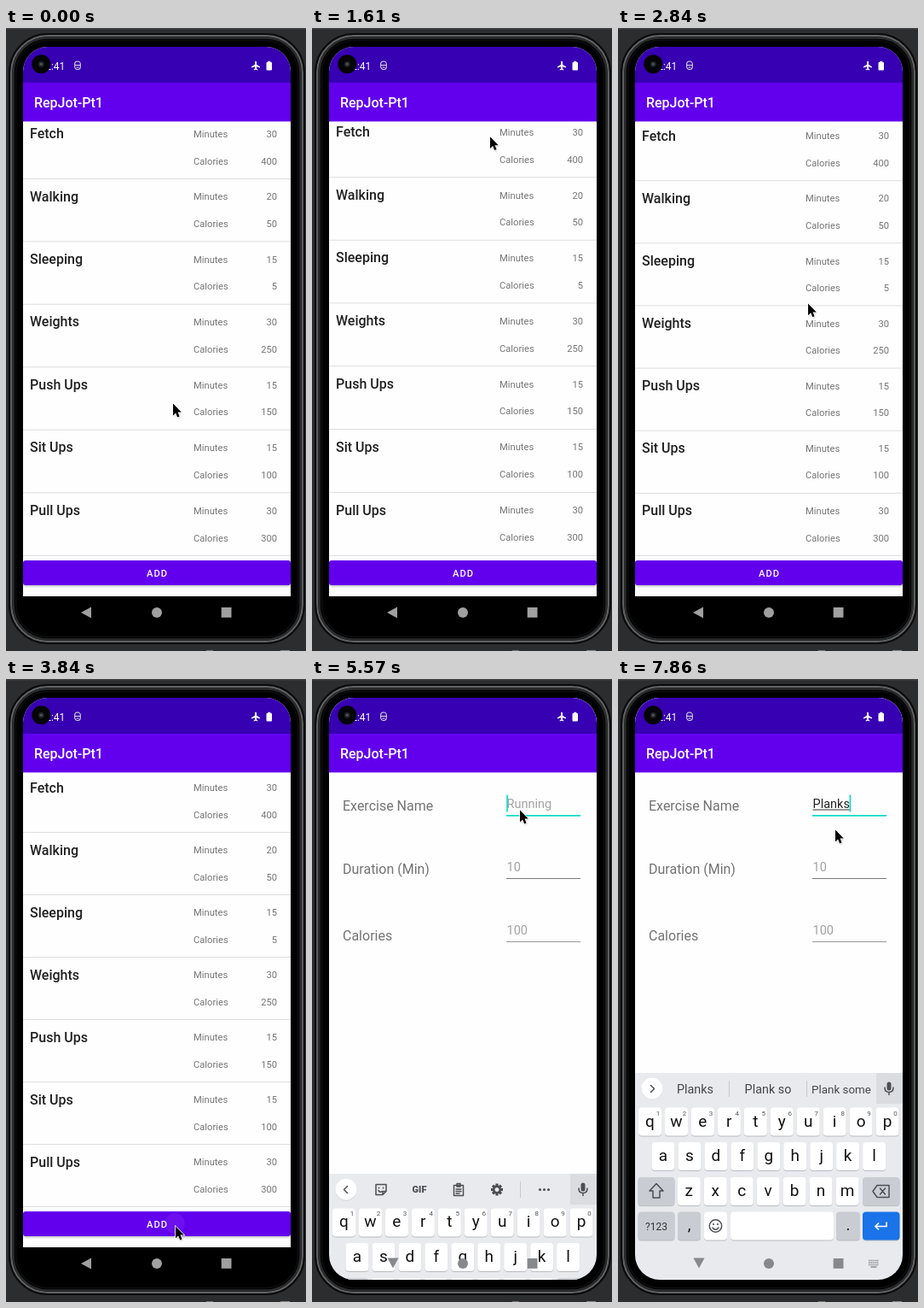
Animation, 352 px wide and 729 px high, one loop 8 s. Source, as an HTML page:

```html
<!DOCTYPE html>
<html lang="en">
<head>
<meta charset="utf-8">
<title>Exercise log</title>
<style>
html, body { margin: 0; width: 100%; height: 100%; overflow: hidden; background: #2c2d2f; }
svg { display: block; width: 352px; height: 729px; font-family: Roboto, sans-serif; }
.title { font-size: 16px; font-weight: 500; fill: #fff; }
.name { font-size: 16px; font-weight: 500; fill: #202020; }
.cell { font-size: 11.2px; fill: #757575; }
.end { text-anchor: end; }
.mid { text-anchor: middle; }
.btn { font-size: 11.2px; font-weight: 500; fill: #fff; letter-spacing: 1px; text-anchor: middle; }
.label { font-size: 16px; fill: #737373; }
.field { font-size: 14.5px; }
.key { font-size: 19px; fill: #111; text-anchor: middle; }
.digit { font-size: 8px; fill: #555; text-anchor: middle; }
.word { font-size: 14.4px; fill: #44474b; text-anchor: middle; }
.line { fill: none; stroke: #4b4e52; stroke-width: 1.5; stroke-linejoin: round; stroke-linecap: round; }
</style>
</head>
<body>
<svg id="stage" viewBox="0 0 352 729"></svg>
<script>
const LOOP = 8000;
const ROWS = [
  ['Fetch', 30, 400], ['Walking', 20, 50], ['Sleeping', 15, 5], ['Weights', 30, 250],
  ['Push Ups', 15, 150], ['Sit Ups', 15, 100], ['Pull Ups', 30, 300]
];
const PITCH = 73, LIST_END = 617.5;

// [time, x, y] of the pointer tip
const POINTER = [
  [0, 195, 438], [60, 195, 438], [840, 206, 122], [900, 206, 122], [1240, 202, 452],
  [1610, 208, 126], [1700, 210, 98], [1730, 210, 98], [2070, 222, 440], [2340, 231, 206],
  [2490, 235, 150], [2550, 235, 150], [3280, 198, 638], [3480, 198, 638], [3570, 198, 639],
  [4200, 198, 639], [4630, 232, 659], [4690, 238, 667], [4960, 266, 196], [5250, 245, 149],
  [5420, 243, 152], [7650, 243, 152], [7860, 254, 175]
];
// [time, upward shift of the top divider]
const STRETCH = [
  [0, 3], [60, 3], [840, 9], [900, 9], [1180, 1], [1610, 4.8], [1700, 6], [1730, 6],
  [2010, .6], [2340, 10], [2490, 11.5], [2550, 11.5], [2720, 3], [2950, 0]
];
const TYPED = [[0, ''], [6490, 'P'], [6640, 'Pl'], [6970, 'Pla'], [7120, 'Plan'], [7380, 'Plank'], [7410, 'Planks']];
const WORDS = [
  [0, null], [6520, ['P', 'Push', 'Pull']], [6760, ['Pl', 'Plus', 'Please']],
  [6970, ['Pla', 'Play', 'Playing']], [7140, ['Plan', 'Plans', 'Planning']],
  [7410, ['Plank', 'Planks', 'Planking']], [7650, ['Planks', 'Plank so', 'Plank some']]
];
const CAPS = [6400, 6560];
const PRESS = 3820, OPEN = 4020, FOCUS = 5300, KEYBOARD = 5510;

const text = (x, y, value, cls, extra = '') => `<text x="${x}" y="${y}" class="${cls}" ${extra}>${value}</text>`;
const rect = (x, y, w, h, fill, r = 0, extra = '') =>
  `<rect x="${x}" y="${y}" width="${w}" height="${h}" rx="${r}" fill="${fill}" ${extra}/>`;
const path = (d, extra = 'class="line"') => `<path d="${d}" ${extra}/>`;
const circle = (x, y, r, extra) => `<circle cx="${x}" cy="${y}" r="${r}" ${extra}/>`;
const at = (x, y, body) => `<g transform="translate(${x} ${y})">${body}</g>`;
const button = (x, y, w, label, extra = '') =>
  rect(x, y + 1.5, w, 29, '#000', 3, 'opacity=".25" filter="url(#soft)"') +
  rect(x, y, w, 29, '#6200ee', 3) + extra + text(x + w / 2 + .5, y + 18.5, label, 'btn');

const windowBase = () =>
  rect(20, 22, 314, 643, '#fefefe') + rect(20, 22, 314, 42, '#3700b3') +
  rect(20, 64, 314, 45.4, '#6200ee') + text(33, 93, 'RepJot-Pt1', 'title');

function listScreen() {
  const rows = ROWS.map(([name, minutes, calories], i) => `
    <g id="row${i}">${text(28, 0, name, 'name')}</g>
    <g id="minutes${i}">${text(220, 0, 'Minutes', 'cell')}${text(318, 0, minutes, 'cell end')}</g>
    <g id="calories${i}">${text(220, 0, 'Calories', 'cell')}${text(318, 0, calories, 'cell end')}</g>
    <rect id="rule${i}" x="20" y="-.5" width="314" height="1" fill="#dedede"/>`).join('');
  const ripple = `<g clip-path="url(#addClip)"><circle id="ripple" cx="198" cy="637" fill="#fff"/></g>`;
  return windowBase() + `<g clip-path="url(#listClip)">${rows}</g>` + button(20, 623, 314, 'ADD', ripple);
}

function formScreen() {
  const rows = [['Exercise Name', 154, 151], ['Duration (Min)', 228, 225], ['Calories', 305.5, 299]];
  const hints = ['Running', 10, 100], tones = ['#b0b0b0', '#777', '#999'];
  return windowBase() + rows.map(([label, y, base], i) =>
    text(36, y, label, 'label') +
    text(228.5, base, hints[i], 'field', `id="hint${i}" fill="#a2a2a2"`) +
    rect(228, base + 8, 87, 1, tones[i], 0, `id="under${i}"`)).join('') +
    text(228.5, 151, '', 'field', 'id="typed" fill="#222"') +
    rect(228.5, 152.5, 0, 1, '#333', 0, 'id="compose"') +
    rect(228, 135.5, 1.6, 20, '#03dac5', 0, 'id="caret"') +
    button(140, 599, 74, 'SUBMIT');
}

function key(x, y, w, label, fill = '#fff') {
  return rect(x, y + 1, w, 33, '#b9bcc1', 4) + rect(x, y, w, 33, fill, 4) + label;
}
function letters(chars, x0, y, digits) {
  return [...chars].map((c, i) => {
    const x = x0 + i * 30.95;
    return key(x - 13.5, y, 27, text(x, y + 22, c, 'key letter') +
      (digits ? text(x + 9.5, y + 9, (i + 1) % 10, 'digit') : ''));
  }).join('');
}
function toolbar() {
  const teeth = [...Array(8)].map((_, i) =>
    `<rect x="-1.6" y="-7" width="3.2" height="4" fill="#4b4e52" transform="rotate(${i * 45})"/>`).join('');
  return at(81, 479.5,
      path('M-6 -6H6V2L2 6H-6ZM2 6V2H6M-3 1Q-1 4 1 2') + circle(-2.5, -2, .9, 'fill="#4b4e52"') + circle(2.5, -2, .9, 'fill="#4b4e52"')) +
    text(126, 483.3, 'GIF', 'mid', 'font-size="11" font-weight="900" fill="#4b4e52"') +
    at(172, 480, path('M-5.5 -5.5H5.5V6.5H-5.5ZM-2 -7.5H2V-4H-2ZM-3 -1H3M-3 1.5H3M-3 4H1')) +
    at(217, 479.5, teeth + circle(0, 0, 3.8, 'fill="none" stroke="#4b4e52" stroke-width="2.6"')) +
    rect(244, 470, 1, 19, '#c6c9cd') +
    [267.5, 272.5, 277.5].map(x => circle(x, 479.5, 1.5, 'fill="#4b4e52"')).join('');
}
function keyboard() {
  const grey = '#c9cdd3';
  return rect(20, 461, 314, 243, '#e8eaed') + rect(303, 461, 31, 36, '#dadce0') +
    circle(40, 480, 12.5, 'fill="#c9ccd0"') + circle(40, 479.3, 12.5, 'fill="#fff"') +
    path('', 'id="chevron" class="line"') +
    `<g id="tools">${toolbar()}</g>
    <g id="words">${[90.5, 176, 262].map((x, i) => text(x, 485, '', 'word', `id="word${i}"`)).join('')}
      ${rect(130, 470, 1, 19, '#c6c9cd')}${rect(221, 470, 1, 19, '#c6c9cd')}</g>` +
    at(318, 479, rect(-2.5, -7.5, 5, 10, '#4b4e52', 2.5) + path('M-5 -1Q-5 4.5 0 4.5T5 -1M0 4.5V7.5')) +
    letters('qwertyuiop', 37.5, 501.5, true) + letters('asdfghjkl', 53, 542, false) +
    key(23.5, 583, 43, path('M45 590.5L53 599H49V607H41V599H37Z', 'id="shift" class="line"'), grey) +
    letters('zxcvbnm', 83.3, 583, false) +
    key(287, 583, 43.5, path('M304 592.5H318V606.5H304L299 599.5ZM307.5 596L313.5 603M313.5 596L307.5 603'), grey) +
    key(23.5, 623.5, 43, text(45, 644.5, '?123', 'mid', 'font-size="12" fill="#333"'), grey) +
    key(70, 623.5, 27, text(83.5, 645, ',', 'key'), grey) +
    key(101, 623.5, 27, circle(114.5, 640, 7.2, 'class="line"') + path('M111 642Q114.5 646.5 118 642') +
      circle(112, 638, 1.1, 'fill="#4b4e52"') + circle(117, 638, 1.1, 'fill="#4b4e52"')) +
    key(132, 623.5, 121, '') + key(256, 623.5, 28, text(270, 645, '.', 'key'), grey) +
    key(287, 623.5, 43.5, path('M315 635.5V640.5H302M306 636.5L302 640.5L306 644.5',
      'fill="none" stroke="#fff" stroke-width="1.7"'), '#1a73e8') +
    at(300, 684, path('M-6 -3.5H6M-6 -1H6M-6 1.5H6', 'stroke="#8a8c8f" stroke-width="1.5" stroke-dasharray="1.5 .8"') +
      path('M-3.5 4H3.5', 'stroke="#8a8c8f" stroke-width="1.3"'));
}

function bezel() {
  const ring = (inset, color, width) =>
    `<rect x="${4 + inset}" y="${7 + inset}" width="${346 - 2 * inset}" height="${713 - 2 * inset}" rx="${45 - inset}"
      fill="#000" stroke="${color}" stroke-width="${width}"/>`;
  return rect(0, 0, 352, 729, '#2c2d2f') + rect(0, 0, 352, 1.5, '#424446') +
    ring(0, '#0b0b0b', 2) + ring(2.2, '#606264', 2.2) + ring(4.5, '#2a2b2c', 2.4) + ring(7.5, '#0c0c0c', 2) +
    rect(235, 728, 8, 1, '#777') + rect(322, 728, 11, 1, '#888');
}
function statusIcons() {
  const digits = 'font-size="12" fill="#fff"';
  return text(69.3, 48.5, '2:41', 'end', digits) +
    at(84, 44, path('M-3.3 -1V-2A3.3 3 0 0 1 3.3 -2V1.2A3.3 3.3 0 0 1 -3.3 1.2ZM-3.3 -.5H3.3M-1.5 2H1.5',
      'fill="none" stroke="#ddd" stroke-width="1.1"')) +
    at(293, 44, path('M0 -5.2Q1 -5.2 1 -4V-1.3L5 1.2V2.4L1 1.2V3.6L2.3 4.6V5.4L0 4.8L-2.3 5.4V4.6L-1 3.6V1.2L-5 2.4V1.2L-1 -1.3V-4Q-1 -5.2 0 -5.2Z', 'fill="#fff"')) +
    rect(305.5, 40, 6.5, 9.5, '#fff', 1) + rect(307.3, 38.8, 3, 2, '#fff') +
    circle(41.3, 42.3, 11, 'fill="#050505"') + circle(41.3, 42.3, 3.4, 'fill="#24262a"') + circle(41.3, 42.3, 1.3, 'fill="#56606c"');
}
function pointer() {
  const arrow = 'M1 1.6V15.4L4.1 12.5L6.2 17.5L8.6 16.5L6.5 11.6H10.8Z';
  return `<g id="pointer">` + at(.6, 1.2, path(arrow, 'opacity=".3" filter="url(#soft)"')) +
    path(arrow, 'stroke="#fff" stroke-width="1.6" paint-order="stroke"') + '</g>';
}

document.getElementById('stage').innerHTML = `
  <defs>
    <filter id="soft" x="-20%" y="-30%" width="140%" height="170%"><feGaussianBlur stdDeviation="1.2"/></filter>
    <clipPath id="screenClip"><rect x="20" y="22" width="314" height="681" rx="29"/></clipPath>
    <clipPath id="listClip"><rect x="20" y="109.4" width="314" height="510"/></clipPath>
    <clipPath id="addClip"><rect x="20" y="623" width="314" height="29" rx="3"/></clipPath>
  </defs>
  ${bezel()}
  <g clip-path="url(#screenClip)">
    <g id="list">${listScreen()}</g><g id="form">${formScreen()}</g>
    <rect x="20" y="665" width="314" height="40"/>
    <g id="keyboard">${keyboard()}</g>
    <g id="nav">${path('M-6 0L6 -6.5V6.5Z', 'id="back"')}${circle(177, 684, 6, '')}
      <rect x="252.7" y="678" width="11.8" height="11.8"/></g>
    ${statusIcons()}
  </g>
  ${pointer()}`;

const els = Object.fromEntries([...document.querySelectorAll('[id]')].map(el => [el.id, el]));
const letterEls = [...document.querySelectorAll('.letter')];
const set = (id, name, value) => els[id].setAttribute(name, value);
const show = (id, on) => set(id, 'display', on ? 'inline' : 'none');
const clamp = v => Math.min(1, Math.max(0, v));
const latest = (steps, t) => steps.filter(s => s[0] <= t).pop();

// Monotone cubic through the points; velocity is zero at turning points.
function track(points, t, n) {
  const last = points.length - 1;
  if (t >= points[last][0]) return points[last][n];
  let i = 0;
  while (points[i + 1][0] <= t) i++;
  const slope = j => j < 0 || j >= last ? 0 : (points[j + 1][n] - points[j][n]) / (points[j + 1][0] - points[j][0]);
  const tangent = j => {
    const a = slope(j - 1), b = slope(j);
    return a * b > 0 ? 2 * a * b / (a + b) : 0;
  };
  const [p, q] = [points[i], points[i + 1]], h = q[0] - p[0], u = (t - p[0]) / h, v = 1 - u;
  return p[n] * v * v * (1 + 2 * u) + q[n] * u * u * (3 - 2 * u) + h * u * v * (tangent(i) * v - tangent(i + 1) * u);
}

function drawList(t) {
  const k = track(STRETCH, t, 1);
  const place = (id, y, base = 0) => {
    const u = (LIST_END - y) / 438;
    set(id, 'transform', `translate(0 ${y - k * (1.35 * u - .35 * u * u) + base})`);
  };
  ROWS.forEach((_, i) => {
    const y = 127 + i * PITCH;
    place('row' + i, y, 5.5);
    place('minutes' + i, y, 4.2);
    place('calories' + i, y + 31.5, 4.2);
    place('rule' + i, y + 52.5);
  });
  const p = (t - PRESS) / 280;
  set('ripple', 'r', 8 + 180 * clamp(p) ** 1.5);
  set('ripple', 'opacity', p < 0 ? 0 : .04 + .16 * clamp(p * 2));
}

function drawForm(t) {
  const p = clamp((t - OPEN) / 400), scale = 1 - .15 * (1 - p) ** 4;
  show('form', t >= OPEN);
  set('form', 'opacity', clamp((t - OPEN - 50) / 83));
  set('form', 'transform', `translate(177 343) scale(${scale}) translate(-177 -343)`);

  const [typedAt, typed] = latest(TYPED, t), focused = t >= FOCUS;
  els.typed.textContent = typed;
  const width = typed ? els.typed.getComputedTextLength() : 0;
  show('hint0', !typed);
  set('compose', 'width', width);
  set('under0', 'fill', focused ? '#03dac5' : '#b0b0b0');
  set('under0', 'height', focused ? 1.7 : 1);
  set('caret', 'x', 228.2 + width);
  show('caret', focused && (t - Math.max(FOCUS, typedAt)) % 1010 < 500);
}

function drawKeyboard(t) {
  const p = clamp((t - KEYBOARD) / 285), up = t >= KEYBOARD;
  show('keyboard', up);
  set('keyboard', 'transform', `translate(0 ${243 * (1 - p) ** 3})`);
  set('nav', 'fill', up ? '#86888b' : '#a0a0a0');
  set('back', 'transform', up ? 'translate(95 683.5) rotate(-90)' : 'translate(94 684)');

  const words = latest(WORDS, t)[1];
  show('tools', !words);
  show('words', words);
  set('chevron', 'd', words ? 'M38.5 475.5L42.5 479.5L38.5 483.5' : 'M41.5 475.5L37.5 479.5L41.5 483.5');
  if (words) words.forEach((word, i) => {
    els['word' + i].textContent = word;
    els['word' + i].style.fontSize = word.length > 9 ? '13.4px' : '14.4px';
  });
  const caps = t >= CAPS[0] && t < CAPS[1];
  els.shift.style.fill = caps ? '#4b4e52' : 'none';
  letterEls.forEach(el => el.textContent = caps ? el.textContent.toUpperCase() : el.textContent.toLowerCase());
}

function draw(t) {
  drawList(t);
  drawForm(t);
  drawKeyboard(t);
  set('pointer', 'transform', `translate(${track(POINTER, t, 1)} ${track(POINTER, t, 2)})`);
}

const start = performance.now();
function frame() {
  draw((performance.now() - start) % LOOP);
  requestAnimationFrame(frame);
}
frame();
</script>
</body>
</html>
```
